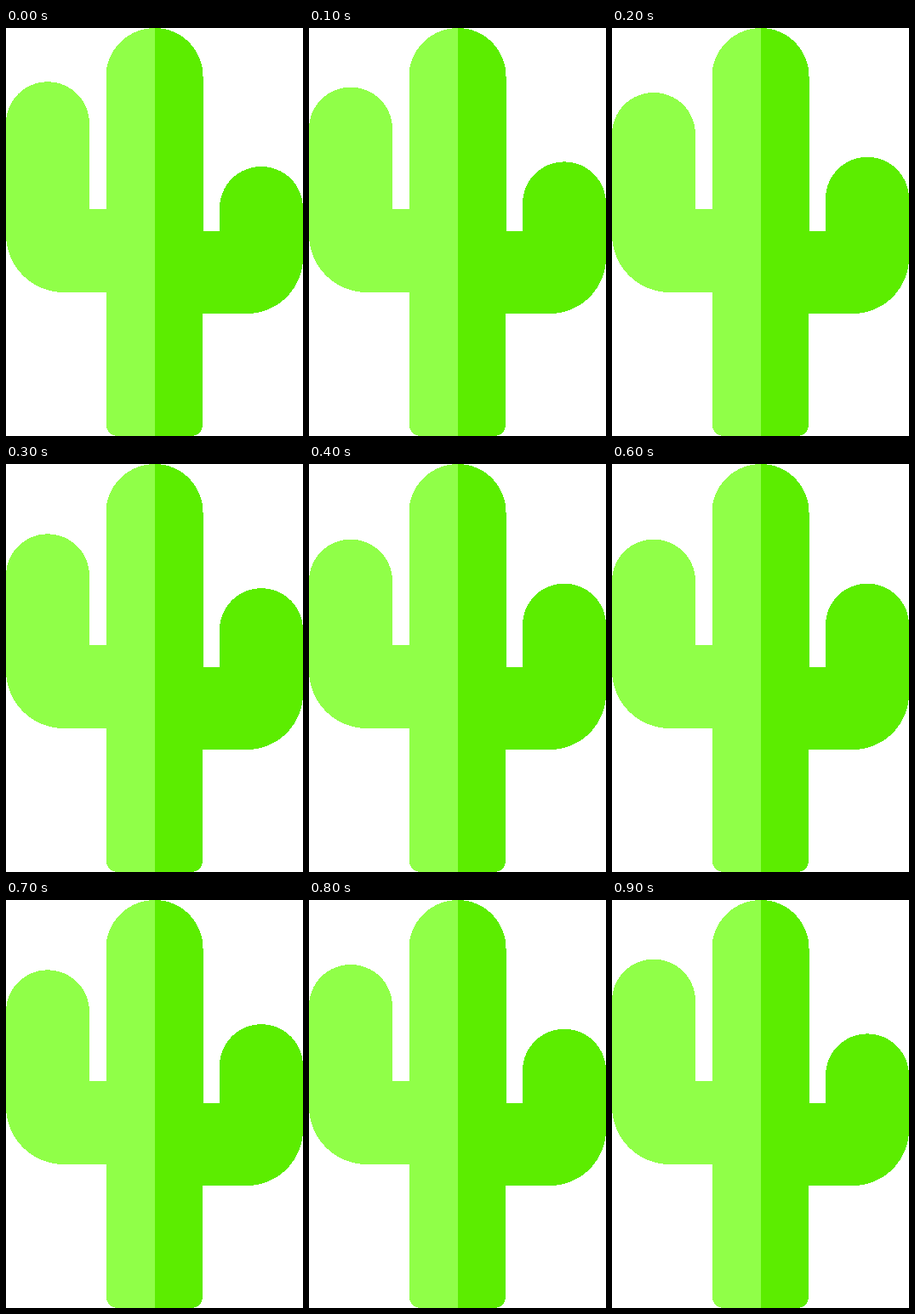
Write an HTML page that moves like this. It is 349 by 480 pixels and loops after 1000 ms.

```html
<!DOCTYPE html>
<html lang="en">
<head>
<meta charset="utf-8">
<title>Cactus</title>
<style>
  html, body { margin: 0; height: 100%; overflow: hidden; background: #fff; }
  svg { display: block; width: 349px; height: 480px; shape-rendering: crispEdges; }
</style>
</head>
<body>
<svg viewBox="0 0 349 480">
  <path id="left" fill="#90ff48"/>
  <path id="right" fill="#5ced00"/>
</svg>
<script>
  const left = document.getElementById('left');
  const right = document.getElementById('right');
  const STEP = 100, STEPS = 10;

  // Each half is trunk plus arm; only the arm's rounded cap moves.
  function draw(now) {
    const step = Math.floor(now / STEP) % STEPS;
    const k = 5 - Math.abs(5 - step);
    const l = 63.3 + 6.35 * k + 49;
    const r = 163 - 5.6 * k + 49;
    left.setAttribute('d', `M175 0A57.5 57 0 0 0 117.5 57V213H98V${l}
      A49 49 0 0 0 0 ${l}V243A68 68 0 0 0 68 311H118V467A13 13 0 0 0 131 480H175Z`);
    right.setAttribute('d', `M175 0A56.5 57 0 0 1 231.5 57V239H251V${r}
      A49 49 0 0 1 349 ${r}V270A66 66 0 0 1 283 336H231V467A13 13 0 0 1 218 480H175Z`);
    requestAnimationFrame(draw);
  }
  draw(0);
</script>
</body>
</html>
```
